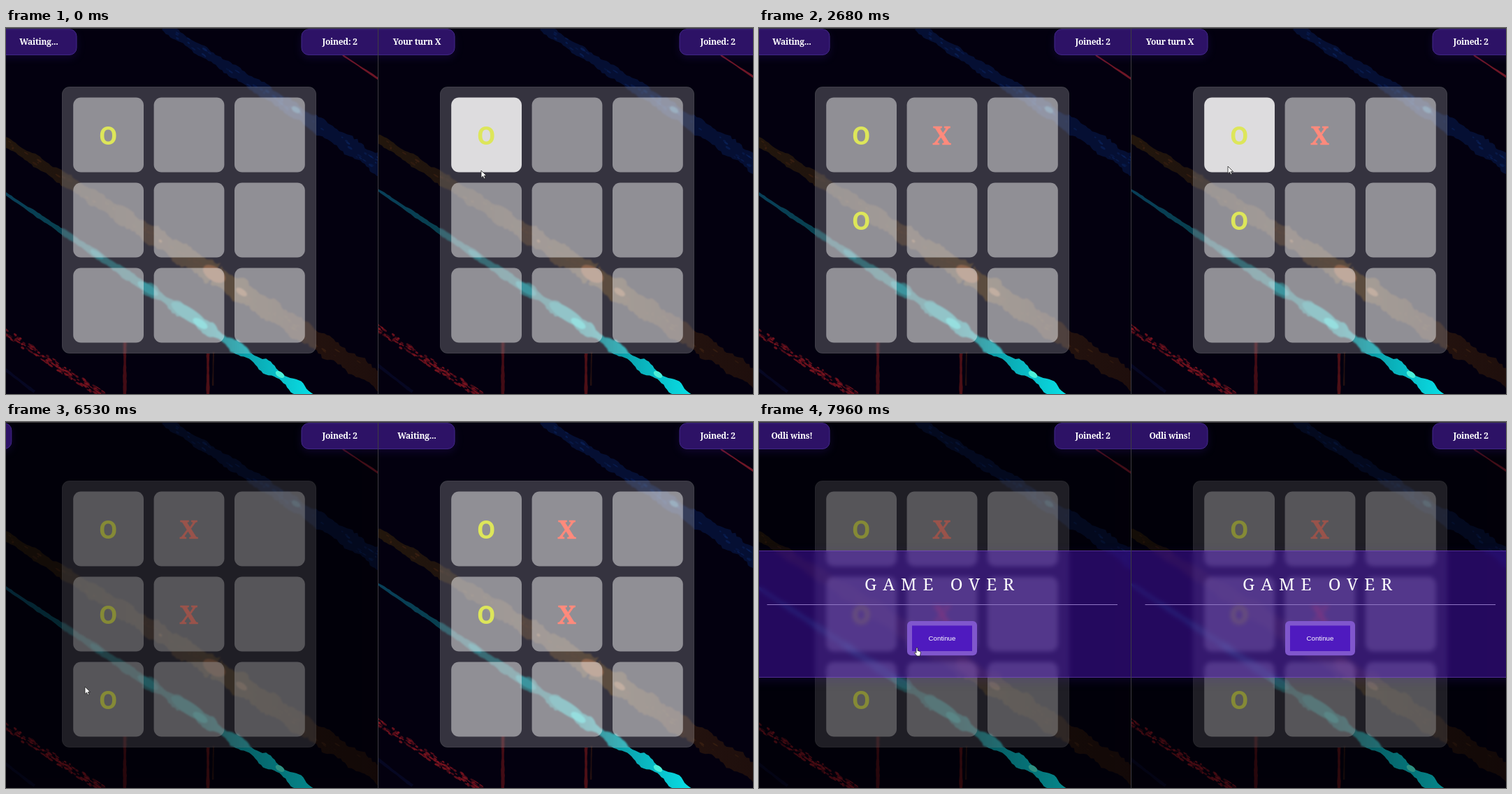
An HTML page that plays this animation: 1069x524 px, repeating every 8000 ms.

```html
<!DOCTYPE html>
<html lang="en">
<head>
<meta charset="utf-8">
<title>Noughts and crosses</title>
<style>
html, body { margin: 0; width: 100%; height: 100%; overflow: hidden; background: #3e3c40; }
.panel { position: absolute; top: 1.3px; bottom: 0; overflow: hidden; background: #03000f; }
.view { position: absolute; top: -1.3px; width: 540px; height: 524px; }
svg { position: absolute; left: 0; top: 0; width: 540px; height: 524px; overflow: visible; }
.board {
  position: absolute; left: 80px; top: 84px; width: 362px; height: 380px;
  border: 1px solid rgba(255,255,255,.05); border-radius: 11px;
  background: rgba(255,255,255,.2); backdrop-filter: blur(1.2px);
}
.dim { position: absolute; left: -20px; top: 0; width: 600px; height: 524px; background: rgba(0,0,0,.4); }
.modal {
  position: absolute; left: -20px; top: 184px; width: 600px; height: 180px;
  border: solid rgba(150,100,230,.4); border-width: 1px 0;
  background: rgba(80,20,200,.45); backdrop-filter: blur(3px);
  box-shadow: 0 4px 14px rgba(70,30,180,.18);
}
.modal svg { left: 20px; top: -185px; }
.slab { font-family: 'Roboto Slab', 'Noto Serif', serif; font-weight: 700; }
.tag { font-size: 12px; letter-spacing: -.25px; fill: #fff; text-anchor: middle; }
.mark { font-size: 36px; text-anchor: middle; }
.O { font: 700 37.5px Roboto, sans-serif; fill: #dde65a; }
.X { fill: #ff8a7c; stroke: #ff8a7c; stroke-width: .6; }
.title { font-size: 24px; font-weight: 300; letter-spacing: 9px; fill: #fff; }
.button { font: 9.7px 'Liberation Sans', Arial, sans-serif; fill: #fff; text-anchor: middle; }
.tagbox { filter: drop-shadow(0 4px 6px rgba(70,30,180,.18)); }
#pointer { width: 1069px; height: 524px; }
</style>
</head>
<body>
<script>
const LOOP = 8000;
const PITCH_X = 115.4, PITCH_Y = 122;

function node(parent, tag, attrs = {}, text) {
  const el = document.createElementNS('http://www.w3.org/2000/svg', tag);
  for (const k in attrs) el.setAttribute(k, attrs[k]);
  if (text) el.textContent = text;
  parent.appendChild(el);
  return el;
}
function div(parent, cls) {
  const el = document.createElement('div');
  el.className = cls;
  parent.appendChild(el);
  return el;
}
const show = (el, on) => { el.style.display = on ? '' : 'none'; };
const mix = (a, b, f) => a + (b - a) * f;

let seed = 1;
function rnd() {
  seed = (seed * 16807) % 2147483647;
  return seed / 2147483647;
}

// Paint stroke between two [x, y, width] ends; its width swells in waves
function streak(svg, fill, [x0, y0, w0], [x1, y1, w1], swell = .15) {
  const len = Math.hypot(x1 - x0, y1 - y0);
  const nx = (y0 - y1) / len, ny = (x1 - x0) / len;
  const phase = rnd() * 6;
  const top = [], bottom = [];
  for (let d = 0; d <= len; d += 4) {
    const f = d / len, x = mix(x0, x1, f), y = mix(y0, y1, f);
    const w = mix(w0, w1, f) / 2 * (1 + swell * Math.sin(d / 8 + phase));
    const a = w * (.85 + .3 * rnd()), b = w * (.85 + .3 * rnd());
    top.push((x + nx * a) + ',' + (y + ny * a));
    bottom.unshift((x - nx * b) + ',' + (y - ny * b));
  }
  node(svg, 'polygon', { points: top.concat(bottom).join(' '), fill });
}

// Broken stroke made of scattered flecks
function flecks(svg, fill, [x0, y0, w0], [x1, y1, w1], count) {
  const angle = Math.atan2(y1 - y0, x1 - x0) * 180 / Math.PI;
  for (let i = 0; i < count; i++) {
    const f = rnd(), off = (rnd() - .5) * mix(w0, w1, f);
    blob(svg, fill, mix(x0, x1, f), mix(y0, y1, f) + off, 1.5 + 3 * rnd(), .7 + rnd(), angle, .3 + .6 * rnd());
  }
}

function blob(svg, fill, x, y, rx, ry, angle = 33, opacity = 1) {
  node(svg, 'ellipse', { cx: x, cy: y, rx, ry, fill, opacity, transform: `rotate(${angle} ${x} ${y})` });
}

function gradient(svg, id, x2, colors) {
  const g = node(node(svg, 'defs'), 'linearGradient', { id, gradientUnits: 'userSpaceOnUse', x1: 0, x2, y1: 0, y2: 0 });
  colors.forEach((c, i) => node(g, 'stop', { offset: i / (colors.length - 1), 'stop-color': c }));
  return `url(#${id})`;
}

function paintBackdrop(svg, side) {
  seed = 77;
  streak(svg, '#050f33', [226, -2, 12], [545, 203, 25]);
  flecks(svg, '#0a2056', [240, 7, 10], [545, 203, 20], 60);
  blob(svg, '#1c4a70', 415, 117, 7, 4);
  streak(svg, '#24081a', [445, 14, 1.5], [485, 41, 2]);
  streak(svg, '#6e1626', [482, 39, 2], [545, 81, 3]);

  const brown = gradient(svg, 'brown' + side, 540, ['#22160c', '#1f130e', '#2c1b14', '#33200f', '#23120e', '#1e0e0c']);
  streak(svg, brown, [-10, 157, 11], [300, 354, 30]);
  streak(svg, brown, [300, 354, 30], [545, 512, 25]);
  flecks(svg, '#3a2012', [-10, 157, 8], [545, 512, 20], 70);
  blob(svg, '#6e3c20', 298, 352, 18, 10);
  blob(svg, '#74482a', 337, 378, 9, 4.5);
  blob(svg, '#74482a', 221, 305, 2.5, 1.5);

  const cyan = gradient(svg, 'cyan' + side, 440, ['#083f58', '#08404e', '#084a55', '#075c66', '#0aa8b2', '#08dfe6']);
  streak(svg, cyan, [-10, 231, 3], [200, 371, 14]);
  streak(svg, cyan, [200, 371, 14], [440, 530, 14], .4);
  blob(svg, '#086a78', 130, 324, 11, 4);
  blob(svg, '#0a7a86', 203, 373, 17, 6);
  blob(svg, '#087a82', 262, 410, 30, 9);
  blob(svg, '#12b4b6', 278, 423, 12, 5.5);
  blob(svg, '#4cf0d8', 392, 496, 7, 4);

  flecks(svg, '#7c1420', [-10, 430, 12], [140, 527, 14], 150);
  streak(svg, '#430c15', [170, 450, 4], [170, 528, 5]);
  streak(svg, '#4c0f16', [289, 466, 4], [289, 528, 4]);
  streak(svg, '#241010', [297, 464, 2], [296, 515, 2]);
  streak(svg, '#060722', [-10, 482, 4], [42, 522, 4]);
}

function tag(svg, x, width, centre, text) {
  const g = node(svg, 'g');
  node(g, 'rect', { x, y: 1.8, width, height: 36.6, rx: 10, fill: '#2d1266', stroke: '#43298a', class: 'tagbox' });
  const label = node(g, 'text', { x: centre, y: 24, class: 'slab tag' }, text);
  return { g, label };
}

function makePanel(side, left, width, shift) {
  const panel = div(document.body, 'panel');
  panel.style.left = left + 'px';
  panel.style.width = width + 'px';
  const view = div(panel, 'view');
  view.style.left = shift + 'px';

  paintBackdrop(node(view, 'svg'), side);
  div(view, 'board');

  const front = node(view, 'svg');
  const cells = [], marks = [];
  for (let i = 0; i < 9; i++) {
    const x = 96.2 + (i % 3) * PITCH_X, y = 99.5 + Math.floor(i / 3) * PITCH_Y;
    cells.push(node(front, 'rect', { x, y, width: 100.8, height: 107, rx: 11, fill: '#fff' }));
    marks.push(node(front, 'text', { x: x + 50.1, y: y + 67.5 }));
  }

  const dim = div(view, 'dim');
  const modal = div(view, 'modal');
  const m = node(modal, 'svg');
  node(m, 'text', { x: 151, y: 240.5, class: 'slab title' }, 'GAME OVER');
  node(m, 'rect', { x: 11.5, y: 261, width: 501.5, height: 1, fill: '#8f76c4' });
  node(m, 'rect', { x: 212, y: 285, width: 100, height: 49.3, rx: 6, fill: '#8057cd' });
  node(m, 'rect', { x: 219, y: 291.5, width: 86, height: 36.5, fill: '#4f1abf' });
  node(m, 'text', { x: 262, y: 313, class: 'button' }, 'Continue');

  const tags = node(view, 'svg');
  const status = tag(tags, -20, 121, 47, '');
  tag(tags, 423, 140, 477.5, 'Joined: 2');
  return { cells, marks, dim, modal, status, originX: left + shift };
}

const panels = [makePanel(0, 0, 531.7, 0), makePanel(1, 533, 536, 7.8)];

// Each turn: the cell and when either panel shows it
const turns = [
  { cell: 0, seen: [0, 0] },
  { cell: 1, seen: [1350, 980] },
  { cell: 3, seen: [1820, 2440] },
  { cell: 4, seen: [4520, 4030] },
  { cell: 6, seen: [6420, 6690] }
];
const signOf = turn => 'OX'[turn % 2];

// Pointer trips: each reaches (x, y) in even steps between two times
const trips = [
  { from: 0, to: 0, steps: 1, x: 680, y: 204 },
  { from: 120, to: 120, steps: 1, x: 679, y: 211 },
  { from: 390, to: 610, steps: 3, x: 790, y: 190 },
  { from: 1350, to: 1560, steps: 3, x: 130, y: 228 },
  { from: 2440, to: 2680, steps: 4, x: 671, y: 198 },
  { from: 2920, to: 2920, steps: 1, x: 708, y: 210 },
  { from: 3060, to: 3400, steps: 4, x: 759, y: 264 },
  { from: 4980, to: 5670, steps: 7, x: 113, y: 379 },
  { from: 7560, to: 7960, steps: 4, x: 222, y: 322 }
];

function pointerAt(t) {
  let x = trips[0].x, y = trips[0].y;
  for (const trip of trips) {
    if (t < trip.from) break;
    const pace = (trip.to - trip.from) / (trip.steps - 1) || 1;
    const f = Math.min(1, (Math.floor((t - trip.from) / pace + .001) + 1) / trip.steps);
    x = mix(x, trip.x, f);
    y = mix(y, trip.y, f);
  }
  return { x, y };
}

// Cell under the pointer; gaps belong to the nearest cell
function cellAt(x, y) {
  const col = Math.floor((x - 89) / PITCH_X), row = Math.floor((y - 92) / PITCH_Y);
  return col >= 0 && col < 3 && row >= 0 && row < 3 ? row * 3 + col : -1;
}

const pointer = node(document.body, 'svg', { id: 'pointer' });
const ink = { fill: '#fff', stroke: '#222', 'stroke-width': .8 };
const arrow = node(pointer, 'path', { d: 'M0 0V10.4L2.5 8.2L4.2 11.8L5.9 11L4.3 7.6H7.6Z', ...ink });
const hand = node(pointer, 'path', { d: 'M3 1.6Q4 .3 5 1.6V5.4L8 6.2Q9.5 6.8 9.3 8.5L8.4 13H4L.6 8.8Q.5 7.2 2 7.8L3 8.6Z', ...ink });

// CSS "ease" timing: cubic-bezier(.25, .1, .25, 1)
function ease(p) {
  if (p <= 0) return 0;
  if (p >= 1) return 1;
  const curve = (s, a, b) => 3 * s * (1 - s) ** 2 * a + 3 * s * s * (1 - s) * b + s ** 3;
  let lo = 0, hi = 1;
  for (let i = 0; i < 24; i++) {
    const mid = (lo + hi) / 2;
    if (curve(mid, .25, .25) < p) lo = mid; else hi = mid;
  }
  return curve(lo, .1, 1);
}

function statusText(side, last) {
  if (last === turns.length - 1) return 'Odli wins!';
  const next = signOf(last + 1);
  return next === 'OX'[side] ? 'Your turn ' + next : 'Waiting...';
}

// The slide-in is captured every 130 ms
const captured = t => 6690 + 130 * Math.floor((t - 6690) / 130);

function render(t) {
  const p = pointerAt(t);
  panels.forEach((panel, side) => {
    let last = 0;
    turns.forEach(({ cell, seen }, i) => {
      const on = t >= seen[side];
      if (on) last = i;
      panel.marks[cell].textContent = on ? signOf(i) : '';
      panel.marks[cell].setAttribute('class', 'slab mark ' + signOf(i));
    });
    const over = last === turns.length - 1;
    const hover = over ? -1 : cellAt(p.x - panel.originX, p.y);
    panel.cells.forEach((c, i) => c.setAttribute('fill-opacity', i === hover ? .83 : .45));
    panel.status.label.textContent = statusText(side, last);

    const age = captured(t) - turns[last].seen[side] + 65;
    const rest = over ? 1 - ease(age / 600) : 0;
    show(panel.dim, over);
    show(panel.modal, over);
    panel.modal.style.top = 184 + rest * 524 + 'px';
    panel.status.g.setAttribute('transform', `translate(${-rest * 108} 0)`);
  });
  const onButton = p.x > 212 && p.x < 312 && t > trips[trips.length - 1].from;
  show(arrow, !onButton);
  show(hand, onButton);
  (onButton ? hand : arrow).setAttribute('transform', `translate(${p.x} ${p.y})`);
}

const start = performance.now();
function loop() {
  render((performance.now() - start) % LOOP);
  requestAnimationFrame(loop);
}
loop();
</script>
</body>
</html>
```
